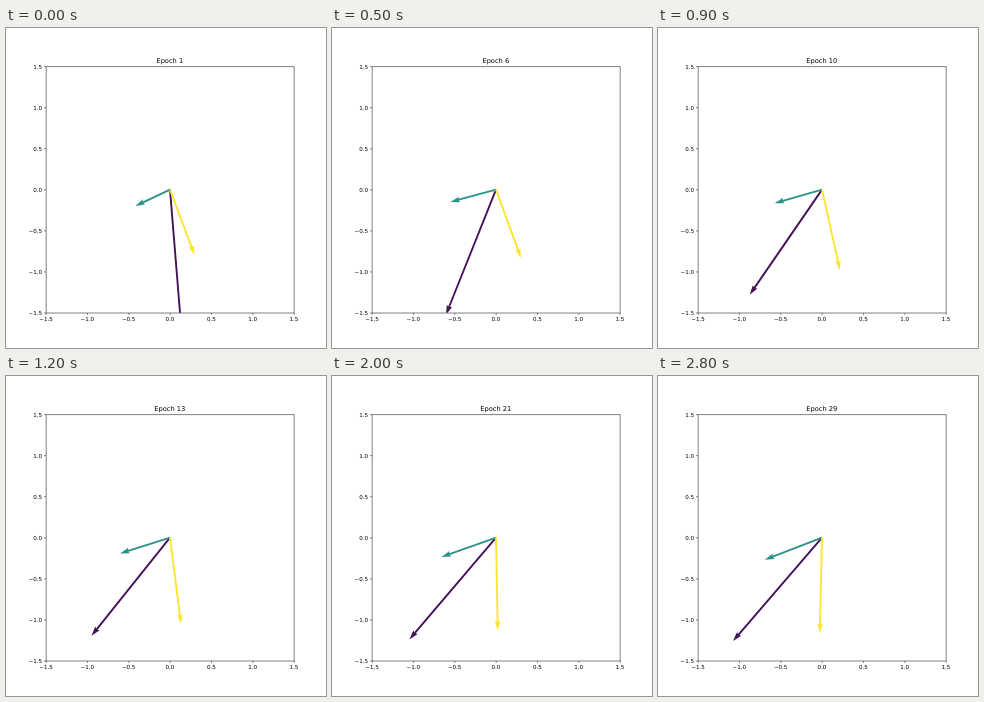
These frames come from a looping animation (320x320 px, 2900 ms). An HTML page:

```html
<!DOCTYPE html>
<html lang="en">
<head>
<meta charset="utf-8">
<title>Epoch vectors</title>
<style>
html, body { margin: 0; width: 100%; height: 100%; overflow: hidden; background: #fff; }
svg { display: block; width: 100vw; height: 100vh; }
text { font: 5.56px "DejaVu Sans", sans-serif; text-rendering: geometricPrecision; text-anchor: middle; }
#title { font-size: 6.67px; }
.y { text-anchor: end; }
#axes { fill: none; stroke: #000; stroke-width: .5; }
</style>
</head>
<body>
<svg viewBox="0 0 320 320">
  <clipPath id="plot"><rect x="40" y="38.4" width="248" height="246.4"/></clipPath>
  <g id="arrows" clip-path="url(#plot)"></g>
  <path id="axes" d="M40.2 38.6H288.2V285H40.2Z"/>
  <g id="labels"></g>
  <text id="title" x="163.8" y="35.1">Epoch 1</text>
</svg>
<script>
const EPOCHS = 29, STEP = 100, OX = 164, OY = 161.6, SHAFT = 1.9;
const $ = id => document.getElementById(id);

function add(parent, tag, attrs, text = '') {
  const el = document.createElementNS('http://www.w3.org/2000/svg', tag);
  for (const key in attrs) el.setAttribute(key, attrs[key]);
  el.textContent = text;
  return parent.appendChild(el);
}

// Ticks and their labels
let ticks = '';
for (let i = -3; i <= 3; i++) {
  const x = OX + .2 + i * 248 / 6, y = OY + .2 - i * 246.4 / 6;
  const label = (i < 0 ? '\u2212' : '') + Math.abs(i / 2).toFixed(1);
  ticks += `M${x} 285v1.8M40 ${y}h-1.95`;
  add($('labels'), 'text', { x: x - .2, y: 292.9 }, label);
  add($('labels'), 'text', { x: 36, y: y + 2, class: 'y' }, label);
}
$('axes').setAttribute('d', $('axes').getAttribute('d') + ticks);

// Each arrow tip passes through these points at the key epochs
const keys = [1, 4, 8, 13, 20, EPOCHS];
const arrows = [
  { color: '#45125a', tips: [[178.6, 341], [134, 303], [99.8, 275], [85.5, 259.8], [78, 263.1], [75, 265]] },
  { color: '#2b938b', tips: [[129.4, 178], [119.6, 174.7], [118.2, 174], [114, 177.4], [109.9, 180.5], [106.8, 183.7]] },
  { color: '#fae631', tips: [[188.6, 227], [190.3, 224.2], [186.3, 236.8], [175, 247.8], [166.5, 253.9], [161.8, 257.3]] }
];
for (const a of arrows) a.el = add($('arrows'), 'path', { fill: a.color });

// Smooth curve through the unevenly spaced keys
function tipAt(tips, t) {
  const last = keys.length - 1;
  const i = Math.max(0, keys.findIndex(k => k >= t) - 1);
  const h = keys[i + 1] - keys[i], u = (t - keys[i]) / h, v = 1 - u;
  return [0, 1].map(axis => {
    const slope = k => {
      const p = Math.max(0, k - 1), q = Math.min(last, k + 1);
      return (tips[q][axis] - tips[p][axis]) / (keys[q] - keys[p]);
    };
    return v * v * (1 + 2 * u) * tips[i][axis] + u * u * (3 - 2 * u) * tips[i + 1][axis]
      + h * u * v * (v * slope(i) - u * slope(i + 1));
  });
}

function arrowPath([x, y]) {
  const dx = x - OX, dy = y - OY, len = Math.hypot(dx, dy), w = SHAFT;
  const c = dx / len, s = dy / len;
  const neck = len - 4.5 * w, barb = len - 5 * w;
  const points = [[0, -w / 2], [neck, -w / 2], [barb, -1.5 * w], [len, 0],
    [barb, 1.5 * w], [neck, w / 2], [0, w / 2]];
  return 'M' + points.map(([p, q]) =>
    (OX + p * c - q * s).toFixed(2) + ' ' + (OY + p * s + q * c).toFixed(2)).join('L') + 'Z';
}

let shown = 0;
function draw() {
  const epoch = 1 + Math.floor(performance.now() / STEP) % EPOCHS;
  if (epoch !== shown) {
    shown = epoch;
    $('title').textContent = 'Epoch ' + epoch;
    for (const { el, tips } of arrows) el.setAttribute('d', arrowPath(tipAt(tips, epoch)));
  }
  requestAnimationFrame(draw);
}
draw();
</script>
</body>
</html>
```
